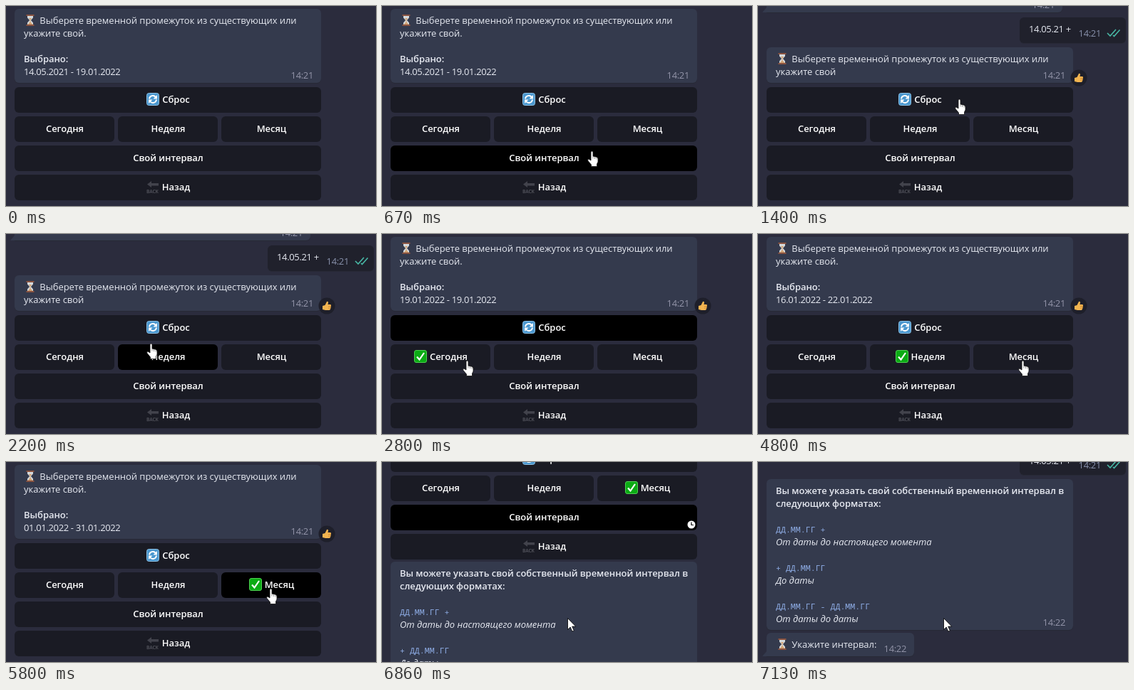
An HTML page that plays this animation: 519x281 px, repeating every 8000 ms.

```html
<!DOCTYPE html>
<html lang="ru">
<head>
<meta charset="utf-8">
<style>
html, body { margin: 0; height: 100%; overflow: hidden; background: #2b2c3d; }
#stage { position: relative; width: 519px; height: 281px; overflow: hidden; color: #e6e9f1; font: 13px/18px "Open Sans", sans-serif; letter-spacing: -.04px; }
#stage div { position: absolute; box-sizing: border-box; }
[hidden] { display: none !important; }
b { font-weight: 600; }
code { font: 11.67px "Noto Sans Mono", monospace; color: #8dabe3; }
time, #range, .out { letter-spacing: -.36px; }
.i { width: 18px; height: 18px; }
.bubble { left: 12px; padding: 7px 13px; border-radius: 6px; background: #343a4d; white-space: pre; box-shadow: 0 1px #272935; }
.bubble > .i { margin: 0 1px 0 0; vertical-align: -4px; }
.bubble time { position: absolute; right: 11px; bottom: 2px; color: #9294a8; }
.tail { border-bottom-left-radius: 0; }
.tail::before { content: ""; position: absolute; left: -6px; bottom: 0; border: solid transparent; border-width: 0 0 7px 6px; border-bottom-color: #343a4d; }
.out { left: 367px; width: 149px; height: 36px; background: #20212c; }
.out time { right: 35px; bottom: 5px; color: #8790aa; }
.key { height: 36px; padding: 0 0 2px 1px; border-radius: 6px; background: #1a1b24; color: #fff; font-weight: 600; display: flex; align-items: center; justify-content: center; gap: 4px; }
.key.hover { background: #000; }
.key .wait { position: absolute; right: 2px; bottom: 2px; width: 12px; height: 12px; }
#hand, #arrow { position: absolute; left: 0; top: 0; overflow: visible; }
#hand { left: -1px; }
</style>
</head>
<body>
<svg width="0" height="0" style="position:absolute">
  <symbol id="hourglass" viewBox="0 0 18 18">
    <path d="M5 2h8v3.5L10 9l3 3.5V16H5v-3.5L8 9 5 5.500z" fill="#d5dadd"/>
    <path d="M7 6h4L9.500 8.500v3l3 3.500h-7l3-3.500v-3z" fill="#d3a374"/>
    <path d="M3.500 1h11v2h-11zM3.500 15h11v2h-11z" fill="#8a5340"/>
  </symbol>
  <symbol id="refresh" viewBox="0 0 18 18">
    <rect x=".5" y=".5" width="17" height="17" rx="3" fill="#4a97cf" stroke="#8fc3e6"/>
    <path d="M4 8.500A5 5 0 0 1 13 6M14 9.500A5 5 0 0 1 5 12" fill="none" stroke="#fff" stroke-width="2"/>
    <path d="M15 3v5.500H9.500zM3 15V9.500h5.500z" fill="#fff"/>
  </symbol>
  <symbol id="back" viewBox="0 0 18 18">
    <path d="M1 5.500 7 1v3h10v3.500H7V10z" fill="#42434c"/>
    <text x="0" y="17.500" font-family="Open Sans, sans-serif" font-size="6.500" font-weight="700" fill="#4d4e57">BACK</text>
  </symbol>
  <symbol id="tick" viewBox="0 0 18 18">
    <rect x=".5" y=".5" width="17" height="17" rx="2.500" fill="#0bab14" stroke="#4fd052"/>
    <path d="m4 9.500 3.500 4L14 4" fill="none" stroke="#fff" stroke-width="2.200"/>
  </symbol>
  <symbol id="clock" viewBox="0 0 12 12">
    <circle cx="6" cy="6" r="5.500" fill="#fff"/>
    <path d="M6 2.500V6.500H9" fill="none" stroke="#000" stroke-width="1.200"/>
  </symbol>
</svg>
<div id="stage">
  <div id="head">
    <div class="bubble tail" style="top:-50px;width:415px;height:43px"><time>14:21</time></div>
    <div class="bubble out" style="top:0">14.05.21 +<time>14:21</time>
      <svg style="position:absolute;left:122px;top:15px" width="20" height="14" fill="none" stroke="#48b8a5" stroke-width="1.600"><path d="m1 7 4 4 8-9M9 10l1.500 1.500 8-9"/></svg>
    </div>
  </div>
  <div id="feed">
    <div id="menu">
      <div id="prompt" class="bubble" style="width:430px"><svg class="i"><use href="#hourglass"/></svg> Выберете временной промежуток из существующих или
укажите свой<span id="chosen">.

<b>Выбрано:</b>
<span id="range"></span></span><time>14:21</time></div>
      <svg id="thumb" style="position:absolute;left:438px;top:89px" width="24" height="24">
        <circle cx="12" cy="12" r="11.500" fill="#1e1f2a"/>
        <path d="M6 12 9.500 11 12 6q2-1 2 1.500L13.500 10H17q1.500.500 1 2l-1 4.500q-.500 1.500-2 1.500H10l-4-1z" fill="#f2b450"/>
        <path d="M14 12.500h4M14 15h3.500" stroke="#c98530" stroke-width=".8"/>
      </svg>
    </div>
    <div id="reply">
      <div class="bubble" style="top:276px;width:430px;height:212px"><b>Вы можете указать свой собственный временной интервал в
следующих форматах:</b>

<code>ДД.ММ.ГГ +</code>
<i>От даты до настоящего момента</i>

<code>+ ДД.ММ.ГГ</code>
<i>До даты</i>

<code>ДД.ММ.ГГ - ДД.ММ.ГГ</code>
<i>От даты до даты</i><time>14:22</time></div>
      <div class="bubble tail" style="top:492px;width:207px;height:33px"><svg class="i"><use href="#hourglass"/></svg> Укажите интервал:<time>14:22</time></div>
    </div>
  </div>
  <svg id="hand" width="16" height="23"><path d="M5 2q1.500-2 3 0v6l5 1.200q2 .6 2 2.800v4l-1.500 3v3.500h-8V20L1 14.500q-1-2.500 1-2.500l3 2z" fill="#fff" stroke="#111" stroke-width=".8"/><path d="M8 8v3.500M10.500 9v3M13 9.500v3" stroke="#555" stroke-width=".6"/></svg>
  <svg id="arrow" width="13" height="20"><path d="M.5.5v16l3.700-3.500 2.600 6 2.500-1.100-2.600-5.800h5z" fill="#fff" stroke="#000" stroke-width=".8"/></svg>
</div>
<script>
const $ = id => document.getElementById(id);
const icon = (name, cls = 'i') => `<svg class="${cls}"><use href="#${name}"/></svg>`;

const keys = {};
function addKey(name, label, x, y, w, image = '') {
  const el = document.createElement('div');
  el.className = 'key';
  el.style.cssText = `left:${x}px;top:${y}px;width:${w}px`;
  el.innerHTML = (image ? icon(image) : icon('tick', 'i tick')) + `<span>${label}</span>` + icon('clock', 'wait');
  $('menu').append(el);
  keys[name] = el;
}
addKey('reset', 'Сброс', 12, 114, 430, 'refresh');
addKey('today', 'Сегодня', 12, 155, 140);
addKey('week', 'Неделя', 157, 155, 140);
addKey('month', 'Месяц', 302, 155, 140);
addKey('own', 'Свой интервал', 12, 196, 430);
addKey('back', 'Назад', 12, 237, 430, 'back');

// Each track lists [start ms, value].
const ranges = [[0, '14.05.2021 - 19.01.2022'], [1400, ''], [2730, '19.01.2022 - 19.01.2022'],
  [4060, '16.01.2022 - 22.01.2022'], [5330, '01.01.2022 - 31.01.2022']];
const ticks = [[0, ''], [2730, 'today'], [4060, 'week'], [5330, 'month']];
const hovers = [[0, ''], [530, 'back'], [660, 'own'], [730, 'week'], [800, 'reset'], [1400, ''], [1470, 'reset'],
  [2200, 'week'], [2330, 'today'], [2730, ''], [2800, 'reset'], [2930, 'today'], [3200, 'week'], [4060, ''],
  [4130, 'week'], [4660, ''], [5400, 'month'], [6000, 'own']];
const waits = [[0, ''], [1130, 'reset'], [1400, ''], [2530, 'today'], [2730, ''], [3730, 'week'], [4060, ''],
  [5130, 'month'], [5330, ''], [6530, 'own']];
const path = [[530, 296, 243], [870, 277, 130], [1950, 277, 130], [2460, 114, 177], [2900, 114, 177],
  [3470, 232, 180], [4420, 232, 180], [4800, 366, 177], [5800, 366, 177], [6190, 254, 218]];

const at = (track, t) => track.findLast(step => step[0] <= t)[1];
const move = (el, x, y) => el.style.transform = `translate(${x}px,${y}px)`;

function pointer(t) {
  const i = path.findIndex(p => p[0] > t);
  if (i < 1) return path.at(i).slice(1);
  const [a, b] = [path[i - 1], path[i]];
  const u = (t - a[0]) / (b[0] - a[0]), k = u * u * (3 - 2 * u);
  return [1, 2].map(n => Math.round(a[n] + (b[n] - a[n]) * k));
}

function draw(t) {
  const range = at(ranges, t), tick = at(ticks, t), hover = at(hovers, t), wait = at(waits, t);
  const sent = t >= 6860, cleared = t >= 7130;

  $('range').textContent = range;
  $('chosen').hidden = !range;
  $('prompt').style.top = (range ? 4 : 58) + 'px';
  for (const name in keys) {
    const el = keys[name], mark = el.querySelector('.tick');
    el.classList.toggle('hover', name === hover);
    if (mark) mark.style.display = name === tick ? '' : 'none';
    el.querySelector('.wait').style.display = name === wait ? '' : 'none';
  }
  $('thumb').style.display = t >= 1130 && !sent ? '' : 'none';

  const u = Math.min(1, Math.max(0, (t - 6866) / 200));
  const scroll = sent ? Math.round(252 - 117 * (1 - u) ** 2) : 0;
  move($('feed'), 0, -scroll);
  move($('head'), 0, cleared ? -18 : (range ? -38 : 16) - scroll);
  $('menu').hidden = cleared;
  $('reply').hidden = !sent;

  move($('hand'), ...pointer(t));
  move($('arrow'), 260, 219);
  $('hand').style.display = t >= 530 && !sent ? '' : 'none';
  $('arrow').style.display = sent ? '' : 'none';
}

function loop() {
  draw(Math.floor((performance.now() + 12) % 8000 * 0.015) / 0.015);
  requestAnimationFrame(loop);
}
loop();
</script>
</body>
</html>
```
